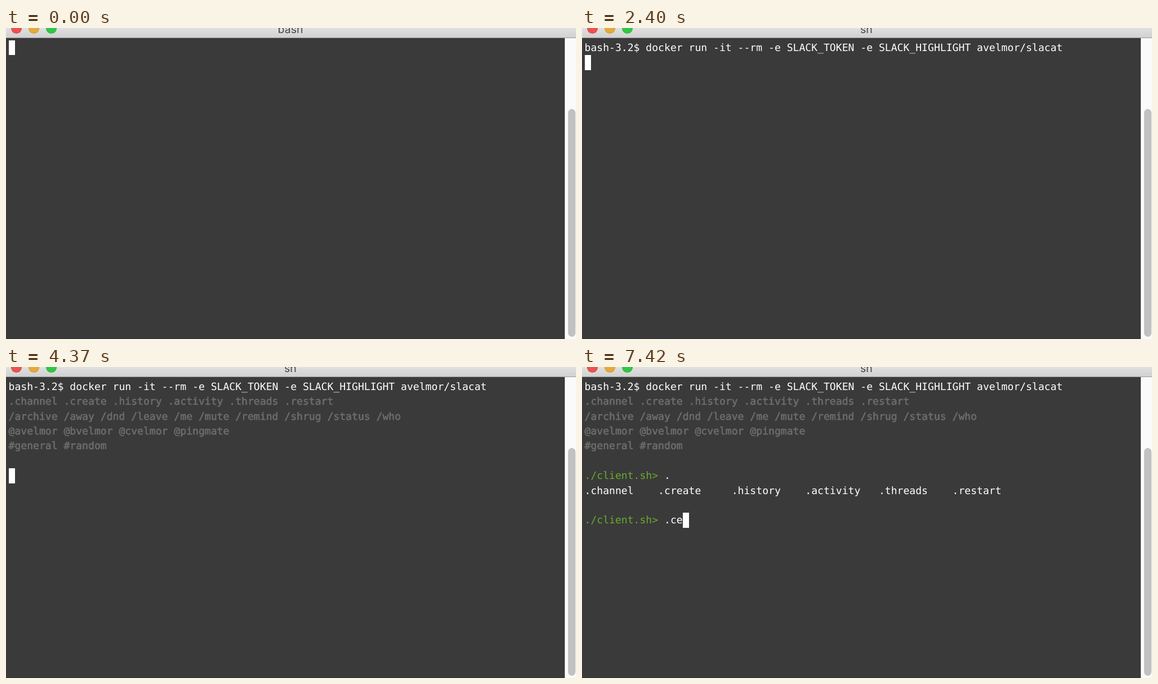
Animation of 1012 by 553 pixels, one loop 8 s. Source, as an HTML page:

```html
<!DOCTYPE html>
<html lang="en">
<head>
<meta charset="utf-8">
<title>Terminal</title>
<style>
  html, body { margin: 0; width: 100%; height: 100%; overflow: hidden; background: #3a3a3a; }
  #stage { position: relative; width: 1012px; height: 553px; overflow: hidden; background: #3a3a3a; }
  #stage div { position: absolute; }
  #bar {
    left: 0; top: 0; width: 1012px; height: 17px;
    background: linear-gradient(#e0e0e0, #d1d1d1);
    border-bottom: 1px solid #969a96;
    overflow: hidden;
  }
  .light {
    top: -9px; width: 19px; height: 19px; border-radius: 50%;
    box-shadow: inset 0 0 0 1px rgba(0, 0, 0, .12);
  }
  #title {
    left: 0; top: -10px; width: 1010px; text-align: center;
    font: 19.5px/24px Inter, "Liberation Sans", sans-serif;
    color: #484848; text-rendering: geometricPrecision;
  }
  #track { left: 992px; top: 18px; width: 20px; height: 535px; background: #fafafa; }
  #track::before { content: ""; position: absolute; width: 1px; height: 100%; background: #e6e6e6; }
  #thumb { left: 6px; top: 126px; width: 13px; height: 405px; border-radius: 6.5px; background: #c1c1c1; }
  #edge { left: 0; top: 552px; width: 992px; height: 1px; background: #303030; }
  .row {
    left: 4.5px; height: 26.37px; white-space: pre; color: #fff;
    font: 18.08px/26.37px "DejaVu Sans Mono", "Noto Sans Mono", monospace;
    text-rendering: geometricPrecision; font-variant-ligatures: none;
  }
  .dim { color: #6c6e6c; -webkit-text-stroke: .6px #6c6e6c; }
  .prompt { color: #69ab2c; }
  #cursor { width: 11px; background: #fff; }
</style>
</head>
<body>
<div id="stage">
  <div id="bar">
    <div class="light" style="left:9px;background:#ee524b"></div>
    <div class="light" style="left:40px;background:#e6aa3b"></div>
    <div class="light" style="left:71px;background:#2fc845"></div>
    <div id="title"></div>
  </div>
  <div id="track"><div id="thumb"></div></div>
  <div id="edge"></div>
  <div id="cursor"></div>
</div>
<script>
const LOOP = 8000, LEFT = 4.5, TOP = 22, CELL = 10.884, PITCH = 26.37;
const byId = id => document.getElementById(id);
const stage = byId('stage'), title = byId('title'), cursor = byId('cursor');

const shell = 'bash-3.2$ ';
const command = 'docker run -it --rm -e SLACK_TOKEN -e SLACK_HIGHLIGHT avelmor/slacat';
const actions = ['.channel', '.create', '.history', '.activity', '.threads', '.restart'];

const dim = text => `<span class="dim">${text}</span>`;
const ask = typed => `<span class="prompt">./client.sh&gt;</span> ${typed}`;
const typed = n => [shell + command.slice(0, n)];

const help = [
  shell + command,
  dim(actions.join(' ')),
  dim('/archive /away /dnd /leave /me /mute /remind /shrug /status /who')
];
const intro = [
  ...help,
  dim('@avelmor @bvelmor @cvelmor @pingmate'),
  dim('#general #random'),
  ''
];
const listed = [...intro, ask('.'), actions.map(a => a.padEnd(12)).join(''), ''];

// start time, window title, rows, cursor column, cursor row
const steps = [
  [0, 'bash', [], 0, 0],
  [1000, 'sh', typed(0), 10, 0],
  [1100, 'sh', typed(17), 27, 0],
  [1200, 'sh', typed(34), 44, 0],
  [1300, 'sh', typed(51), 61, 0],
  [1400, 'sh', typed(67), 77, 0],
  [2400, 'sh', typed(68), 0, 1],
  [3180, 'sh', [...typed(68), ask('')], 13, 1],
  [3400, 'screencapture', [...typed(68), ask('')], 13, 1],
  [4070, 'sh', help, 0, 3],
  [4170, 'bash', intro, 0, 6],
  [4370, 'sh', intro, 0, 6],
  [5370, 'sh', [...intro, ask('.')], 14, 6],
  [5610, 'bash', [...intro, ask('.')], 14, 6],
  [5820, 'sh', [...intro, ask('.')], 14, 6],
  [5920, 'sh', listed, 69, 7],
  [6020, 'sh', listed, 0, 9],
  [7020, 'sh', [...listed, ask('.')], 14, 9],
  [7420, 'sh', [...listed, ask('.ce')], 16, 9]
];

const rows = Array.from({ length: 10 }, (_, i) => {
  const row = document.createElement('div');
  row.className = 'row';
  row.style.top = TOP + 1 + i * PITCH + 'px';
  stage.insertBefore(row, cursor);
  return row;
});

function show([, name, lines, col, line]) {
  title.textContent = name;
  rows.forEach((row, i) => { row.innerHTML = lines[i] || ''; });
  const top = Math.floor(TOP + line * PITCH);
  const bottom = Math.round(TOP + (line + 1) * PITCH);
  cursor.style.left = Math.round(LEFT + col * CELL) + 'px';
  cursor.style.top = top + 'px';
  cursor.style.height = bottom - top + 'px';
}

let current;
const start = performance.now();
function tick() {
  const t = Math.max(0, performance.now() - start) % LOOP;
  const step = steps.filter(s => s[0] <= t).pop();
  if (step !== current) show(current = step);
  requestAnimationFrame(tick);
}
tick();
</script>
</body>
</html>
```
